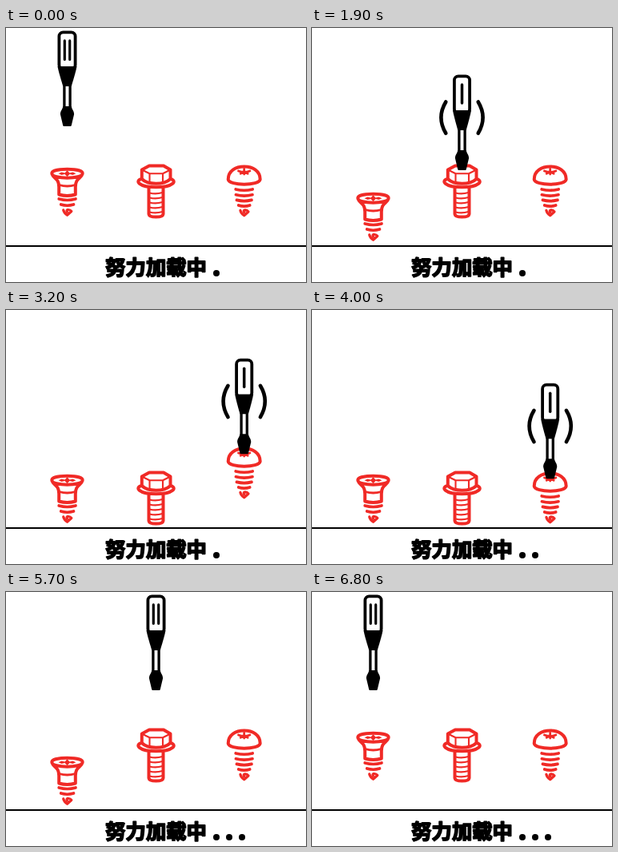
These frames come from a looping animation (375x318 px, 6.9 s). An HTML page:

```html
<!DOCTYPE html>
<html lang="zh-CN">
<head>
<meta charset="utf-8">
<style>
  html, body { margin: 0; width: 100%; height: 100%; overflow: hidden; background: #fff; }
  svg { display: block; }
  .screw { fill: none; stroke: #f02a26; stroke-width: 4; stroke-linecap: round; stroke-linejoin: round; }
  .thin { stroke-width: 2.1; }
  .thread { stroke-width: 3.7; }
  .tip { stroke-width: 3.2; }
  .solid { fill: #f02a26; stroke: none; }
  .line { fill: none; stroke: #000; stroke-linecap: round; }
  text { font: 900 25.3px "Noto Sans CJK SC", "Noto Sans CJK", sans-serif; stroke: #000; stroke-width: 1.8; stroke-linejoin: round; }
</style>
</head>
<body>
<svg width="375" height="318" viewBox="0 0 375 318">
  <!-- screws: x is measured from the axis -->
  <g class="screw">
    <path d="M-19.2 182C-19.2 175 19.2 175 19.2 182C19.2 189.6-19.2 189.6-19.2 182
      C-18 189-10.3 187-10.3 199V208.5Q0 211.5 10.3 208.5V199C10.3 187 18 189 19.2 182"/>
    <path d="M-10 196.5Q0 199.5 10 196.5" stroke-width="2.8"/>
    <path class="solid" d="M-11 182.3L-7 180.6L-3 181.6L0 178.3L3 181.6L7 180.6L11 182.3L7 184L3 183L0 186.3L-3 183L-7 184Z"/>
    <path class="thread" d="M-10.3 214Q0 217 10.5 214M-7.8 221Q0 223.5 8 221"/>
    <path class="tip" d="M-4.8 227.8Q-4 231.5 0 234.3L5.3 229.5Q3.5 227 .3 227.6Q-1 228.6 0 230"/>
  </g>
  <g class="screw">
    <path d="M-17.7 189V177.5L-8.5 172.5H9.5L18 177.5V189Q12 194.8 0 194.8T-17.7 189
      C-27 191-22 199.3 0 199.3S27 191 18 189"/>
    <path class="thin" d="M-17.7 177.5L-8 182.3H8.5L18 177.5M-8 182.3V194M8.5 182.3V194"/>
    <path d="M-9 200.5V233Q-8.5 236.6 0 236.6T9 233V200.5"/>
    <path class="thin" d="M-8 206.5Q0 208.5 8 206M-8 212.5Q0 214.5 8 212M-8 218.5Q0 220.5 8 218M-8 224.5Q0 226.5 8 224M-8 230.5Q0 232.5 8 230"/>
  </g>
  <g class="screw">
    <path d="M-20 189.5C-20 179-11 173.5 0 173.5S20 179 20 189.5C19 197.8-19 197.8-20 189.5Z"/>
    <path d="M-7.2 179Q0 182 7.2 179M0 176.5V183M-4.5 182.3L0 180L4.5 182.3" stroke-width="2.8"/>
    <path class="thread" d="M-10.5 202Q0 204.5 10.5 202M-10.3 208.8Q0 211.3 10.3 208.8M-9.3 215.4Q0 217.8 9.3 215.4M-7 222Q0 224.3 7 222"/>
    <path class="tip" d="M-4.8 228.3Q-4 232 0 234.8L5.3 230Q3.5 227.5 .3 228Q-1 229 0 230.5"/>
  </g>

  <!-- screwdriver: y is measured from its top -->
  <g id="driver">
    <rect id="handle" y="1.9" height="46" rx="5" fill="#fff" stroke="#000" stroke-width="3.8"/>
    <path id="cone"/>
    <path class="line" d="M-3.6 68V97M3.6 68V97" stroke-width="3.3"/>
    <path d="M-5.2 94.5H5.2C6 99 8.6 100 8.6 104.5L5.4 118Q5.2 119.5 4 119.5H-4Q-5.2 119.5-5.4 118L-8.6 104.5C-8.6 100-6 99-5.2 94.5Z"/>
    <path id="still" class="line" d="M-3.2 12.5V36M3.2 12.5V36" stroke-width="3.2"/>
    <g id="spin" class="line">
      <path d="M0 12.5V35.5" stroke-width="3.5"/>
      <path d="M-20.2 34Q-32 53.5-20.2 73.3M20.2 34Q32 53.5 20.2 73.3" stroke-width="4.6"/>
    </g>
  </g>

  <path d="M0 273H375" stroke="#000" stroke-width="2"/>
  <text x="124.3" y="309">努力加载中</text>
  <g id="dots">
    <circle cx="263" cy="307" r="4"/>
    <circle cx="279" cy="307" r="4"/>
    <circle cx="295" cy="307" r="4"/>
  </g>
</svg>
<script>
const LOOP = 6900, DROP = 31, REST = 3.4;
const AXIS = [76.5, 187.5, 297.7];
const CONTACT = [63.3, 58.5, 60.8];   // driver top when it meets each raised screw
const $ = id => document.getElementById(id);
const screws = document.querySelectorAll('.screw');
const dots = $('dots').children;
const show = (el, on) => el.setAttribute('visibility', on ? 'visible' : 'hidden');
const move = (el, x, y) => el.setAttribute('transform', `translate(${x} ${y})`);

// Six steps per screw going in, then the same steps backwards going out.
const starts = [];
for (let i = 0; i < 3; i++) for (const t of [0, 400, 500, 600, 800, 1000]) starts.push(i * 1300 + t);
for (let i = 0; i < 3; i++) for (const t of [0, 300, 500, 700, 800, 900]) starts.push(3700 + i * 1100 + t);
starts[18] = 3900;

function draw(now) {
  const t = now % LOOP;
  const step = starts.filter(s => s <= t).length - 1;
  const pose = Math.min(step, 35 - step);
  const col = Math.floor(pose / 6), phase = pose % 6;
  const spinning = phase === 3 || phase === 4;
  const top = REST + (CONTACT[col] - REST) * Math.min(phase, 3) / 3 + (phase > 3 ? DROP : 0);

  screws.forEach((s, i) => move(s, AXIS[i], pose >= i * 6 + 4 ? DROP : 0));
  move($('driver'), AXIS[col], top);
  const half = spinning ? 9.6 : 10.1, edge = half + 1.9;
  $('handle').setAttribute('x', -half);
  $('handle').setAttribute('width', half * 2);
  $('cone').setAttribute('d', `M${-edge} 44.6H${edge}Q${edge - 1} 51 5.2 69.5H-5.2Q${1 - edge} 51 ${-edge} 44.6Z`);
  show($('still'), !spinning);
  show($('spin'), spinning);
  for (let i = 0; i < 3; i++) show(dots[i], i <= step % 3);
}

const begin = performance.now();
function tick() {
  draw(performance.now() - begin);
  requestAnimationFrame(tick);
}
tick();
</script>
</body>
</html>
```
